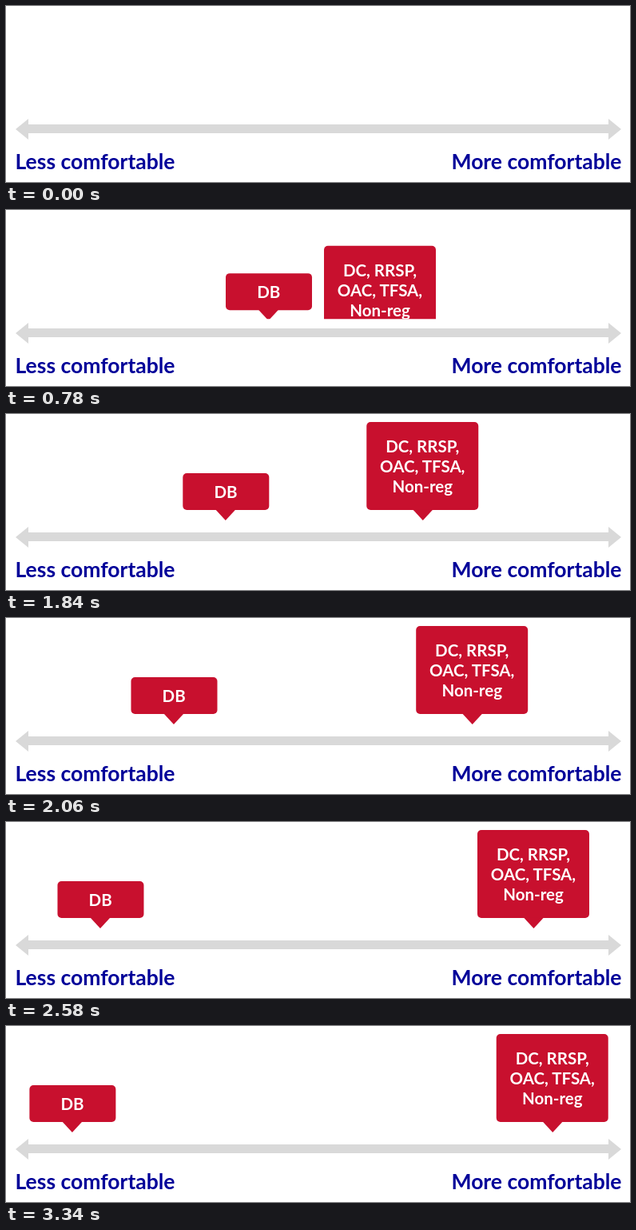
These frames come from a looping animation (781 by 220 pixels, 3360 ms). An HTML page:

```html
<!DOCTYPE html>
<html lang="en">
<head>
<meta charset="utf-8">
<title>Comfort scale</title>
<style>
  html, body { margin: 0; width: 100%; height: 100%; overflow: hidden; background: #fff; }
  svg { display: block; width: 781px; height: 220px; }
  text { font-family: Lato, "Open Sans", sans-serif; font-weight: 700; }
  .label { font-size: 26.5px; fill: #000099; }
  .bubble { fill: #c8102e; }
  .bubble text { font-size: 20.5px; fill: #fff; text-anchor: middle; }
</style>
</head>
<body>
<svg viewBox="0 0 781 220">
  <defs>
    <clipPath id="above"><rect width="781" height="136.2"/></clipPath>
  </defs>

  <path fill="#d9d9d9" d="M12 154 28 141V148H754V141L770 154 754 167V159H28V167Z"/>
  <text class="label" x="11.5" y="204">Less comfortable</text>
  <text class="label" x="770.5" y="204" text-anchor="end">More comfortable</text>

  <g clip-path="url(#above)">
    <g class="bubble" id="pension">
      <rect y="74" width="108" height="46" rx="5"/>
      <path d="M41 119.5H66L53.5 133Z"/>
      <text x="53.7" y="105">DB</text>
    </g>
    <g class="bubble" id="savings">
      <rect y="10" width="140" height="110" rx="5"/>
      <path d="M58 119.5H83L70.5 133Z"/>
      <text x="70" y="48">DC, RRSP,</text>
      <text x="70" y="73">OAC, TFSA,</text>
      <text x="70" y="98">Non-reg</text>
    </g>
  </g>
</svg>
<script>
  const LOOP = 3360;

  // Times in ms; distances in px. The slides are cut off by the loop end.
  const bubbles = [
    {
      node: document.getElementById('pension'), x: 275,
      rise: { start: 392, duration: 545, power: 2, distance: 63 },
      slide: { start: 1694, duration: 1865, power: 3, distance: -246 }
    },
    {
      node: document.getElementById('savings'), x: 398,
      rise: { start: 398, duration: 718, power: 2, distance: 160 },
      slide: { start: 1698, duration: 2095, power: 4, distance: 216.2 }
    }
  ];

  // Share of the way still to go, easing out.
  function remaining(time, { start, duration, power }) {
    const progress = Math.min(1, Math.max(0, (time - start) / duration));
    return (1 - progress) ** power;
  }

  function draw(time) {
    for (const { node, x, rise, slide } of bubbles) {
      const left = x + slide.distance * (1 - remaining(time, slide));
      const drop = rise.distance * remaining(time, rise);
      node.setAttribute('transform', `translate(${left.toFixed(2)} ${drop.toFixed(2)})`);
    }
  }

  const begin = performance.now();
  function tick() {
    draw((performance.now() - begin) % LOOP);
    requestAnimationFrame(tick);
  }
  tick();
</script>
</body>
</html>
```
